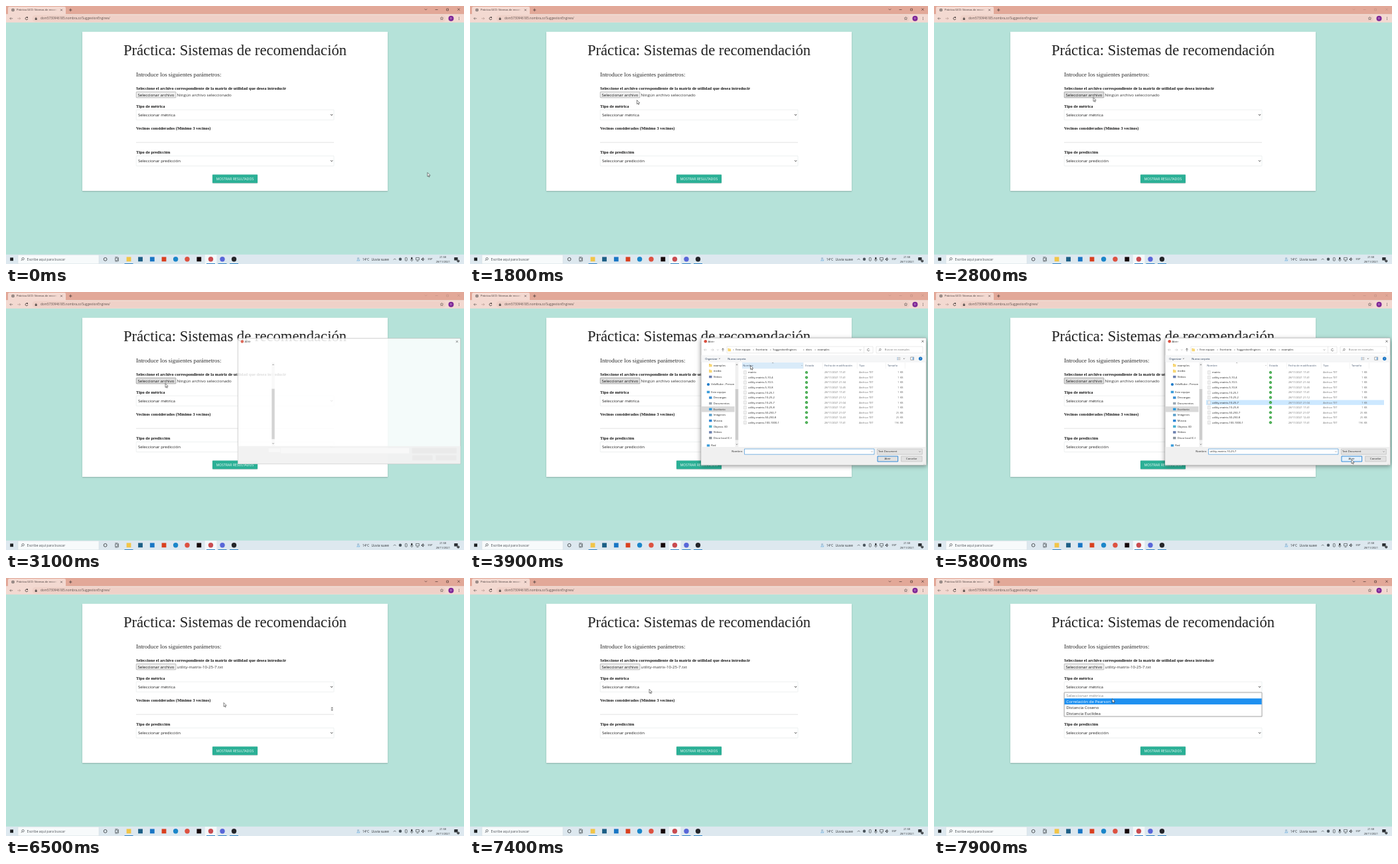
These frames come from a looping animation (690x388 px, 8 s). An HTML page with a canvas:

```html
<!DOCTYPE html>
<html lang="es">
<head>
<meta charset="utf-8">
<title>Sistemas de recomendación</title>
<style>
html, body { margin: 0; width: 100%; height: 100%; overflow: hidden; background: #b5e2d9; }
canvas { display: block; width: 690px; height: 388px; }
</style>
</head>
<body>
<canvas id="stage"></canvas>
<script>
const W = 690, H = 388, LOOP = 8000, STEP = 100;
const SANS = '"Open Sans", "Noto Sans", sans-serif';
const SERIF = '"Liberation Serif", "Noto Serif", serif';
const BAR = '#f3d9d1', FIELD = '#efd1c8';
const canvas = document.getElementById('stage');
const c = canvas.getContext('2d');
const dpr = window.devicePixelRatio || 1;
canvas.width = W * dpr;
canvas.height = H * dpr;

// Moments of the interaction, in ms
const AT = { press: 2300, blur: 2500, open: 3100, ready: 3200, pick: 5300, close: 5900, gone: 6000, menu: 7800 };
const PICKED = 6;

// Pointer stops: time, x, y
const PATH = [
  [0, 635, 250.5], [500, 635, 250.5], [1400, 353, 144.5], [1800, 251.5, 141.5],
  [2100, 240, 137.5], [3200, 240, 137.5], [3900, 422.5, 110.5], [4800, 466, 153],
  [5100, 461, 165], [5400, 461, 165], [5800, 629, 252], [5900, 629, 252],
  [6500, 328, 187.5], [6600, 328, 187.5], [7500, 268, 166.5], [7700, 268, 166.5], [7900, 268.5, 181.6]
];

const FILES = [
  ['matrix', '28', '17:41', 1], ['utility-matrix-5-10-4', '28', '17:41', 1],
  ['utility-matrix-5-10-5', '28', '21:34', 1], ['utility-matrix-5-10-8', '28', '12:45', 1],
  ['utility-matrix-10-25-1', '28', '17:41', 1], ['utility-matrix-10-25-2', '28', '21:12', 1],
  ['utility-matrix-10-25-7', '28', '21:04', 1], ['utility-matrix-10-25-8', '28', '17:41', 1],
  ['utility-matrix-50-250-7', '28', '21:07', 25], ['utility-matrix-50-250-8', '23', '12:43', 25],
  ['utility-matrix-100-1000-1', '28', '17:41', 196]
];

function pointer(t) {
  let i = 0;
  while (i < PATH.length - 2 && t >= PATH[i + 1][0]) i++;
  const [t0, x0, y0] = PATH[i], [t1, x1, y1] = PATH[i + 1];
  const k = Math.min(1, (t - t0) / (t1 - t0)), e = k * k * (3 - 2 * k);
  return { x: x0 + (x1 - x0) * e, y: y0 + (y1 - y0) * e };
}

const inside = (p, x0, y0, x1, y1) => p.x >= x0 && p.x <= x1 && p.y >= y0 && p.y <= y1;

function rect(x, y, w, h, fill) {
  c.fillStyle = fill;
  c.fillRect(x, y, w, h);
}

function box(x, y, w, h, fill, stroke, lw = 0.5, r = 0) {
  c.beginPath();
  c.roundRect(x, y, w, h, r);
  if (fill) { c.fillStyle = fill; c.fill(); }
  if (stroke) { c.strokeStyle = stroke; c.lineWidth = lw; c.stroke(); }
}

function dot(x, y, r, fill) {
  c.beginPath();
  c.arc(x, y, r, 0, Math.PI * 2);
  c.fillStyle = fill;
  c.fill();
}

function ring(x, y, r, color, lw = 0.6, a = 0, b = Math.PI * 2) {
  c.beginPath();
  c.arc(x, y, r, a, b);
  c.strokeStyle = color;
  c.lineWidth = lw;
  c.stroke();
}

function line(color, lw, ...p) {
  c.beginPath();
  for (let i = 0; i < p.length; i += 2) c.lineTo(p[i], p[i + 1]);
  c.strokeStyle = color;
  c.lineWidth = lw;
  c.stroke();
}

// y is the middle of the capitals
function text(s, x, y, size, color = '#222', align = 'left', font = SANS, weight = '') {
  c.font = `${weight} ${size}px ${font}`;
  c.textAlign = align;
  c.fillStyle = color;
  c.fillText(s, x, y + size * 0.34);
}

function shadow(color, blur, dy) {
  c.shadowColor = color;
  c.shadowBlur = blur * dpr;
  c.shadowOffsetY = dy * dpr;
}
const noShadow = () => shadow('transparent', 0, 0);

const chevron = (x, y, r, color, lw = 0.6) => line(color, lw, x - r, y - r / 2, x, y + r / 2, x + r, y - r / 2);
const cross = (x, y, r, color, lw = 0.6) => {
  line(color, lw, x - r, y - r, x + r, y + r);
  line(color, lw, x + r, y - r, x - r, y + r);
};
const arrow = (x, y, d, color) => {
  line(color, 0.7, x - 2.2, y, x + 2.2, y);
  line(color, 0.7, x + d * 0.5, y - 1.7, x + d * 2.2, y, x + d * 0.5, y + 1.7);
};
const lens = (x, y, color, s = 1) => {
  ring(x + 0.6 * s, y - 0.6 * s, 1.7 * s, color, 0.6);
  line(color, 0.7, x - 0.6 * s, y + 0.6 * s, x - 2.2 * s, y + 2.2 * s);
};
const folder = (x, y) => {
  rect(x - 2.3, y - 2.2, 2.2, 1, '#e5b93f');
  rect(x - 2.3, y - 1.6, 4.6, 3.8, '#f8d775');
};

function browser(focused) {
  const ink = focused ? '#3c2b27' : '#c08f83';
  rect(0, 0, W, 12.5, '#e2a898');
  rect(0, 12.2, W, 12.6, BAR);
  box(3, 1, 87, 13, BAR, null, 0, 2);
  box(39.5, 13.8, 623, 10, FIELD, null, 0, 5);
  dot(10.5, 6, 2.3, '#67605e');
  line(BAR, 0.5, 8.4, 6, 12.6, 6);
  line(BAR, 0.5, 10.5, 4, 10.5, 8);
  text('Práctica GCO: Sitemas de recom', 16, 6, 4.08, '#3a3030');
  const fade = c.createLinearGradient(69, 0, 78, 0);
  fade.addColorStop(0, BAR + '00');
  fade.addColorStop(1, BAR);
  rect(69, 2, 10, 9, fade);
  cross(83.5, 6, 1.3, '#3a3030');
  line('#3a3030', 0.7, 95, 6, 99.4, 6);
  line('#3a3030', 0.7, 97.2, 3.8, 97.2, 8.2);
  chevron(632.5, 5.2, 1.7, ink);
  line(ink, 0.6, 646.6, 5.5, 650.6, 5.5);
  box(663.7, 4.1, 2.8, 2.8, null, ink, 0.6);
  cross(682, 5.2, 1.7, ink);

  arrow(8, 18.8, -1, '#6b605c');
  arrow(19.5, 18.8, 1, '#b2968d');
  ring(31, 18.8, 1.9, '#3c3432', 0.75, 0.2, 5.4);
  rect(31.3, 16.4, 1.7, 1.6, '#3c3432');
  rect(43.7, 18.3, 3, 2.5, '#4d4644');
  ring(45.2, 18.2, 1, '#4d4644', 0.5, Math.PI, 0);
  text('dom5730946185.nombra.zz/SuggestionEngines/', 52, 18.8, 4.68, '#5d504c');
  c.beginPath();
  for (let i = 0; i < 10; i++) {
    const r = i % 2 ? 1.1 : 2.5, a = i * Math.PI / 5 - Math.PI / 2;
    c.lineTo(656.5 + r * Math.cos(a), 18.8 + r * Math.sin(a));
  }
  c.closePath();
  c.strokeStyle = '#4d4644';
  c.lineWidth = 0.5;
  c.stroke();
  dot(670.5, 18.8, 4, '#7d2596');
  text('D', 670.5, 18.8, 4, '#fff', 'center');
  for (let i = -1; i < 2; i++) dot(682.5, 18.8 + i * 1.7, 0.5, '#4d4644');
}

function select(y, label) {
  box(196.2, y - 7.6, 297.8, 15.2, '#fff', '#dbe0e0', 0.5, 0.6);
  text(label, 199, y, 6.15, '#222');
  chevron(490.6, y, 1.6, '#222', 0.9);
}

function page(t, p) {
  shadow('rgba(0,0,0,.22)', 1.7, 0.7);
  rect(115, 38.8, 460, 239.2, '#fff');
  noShadow();
  text('Práctica: Sistemas de recomendación', 345, 66.3, 22.64, '#212121', 'center', SERIF);
  text('Introduce los siguientes parámetros:', 196, 103.2, 8.9, '#2b2b2b', 'left', SERIF);
  const label = (s, y) => text(s, 196, y, 6.45, '#151515', 'left', SERIF, 'bold');
  label('Seleccione el archivo correspondiente de la matriz de utilidad que desea introducir', 124);
  label('Tipo de métrica', 151);
  label('Vecinos considerados (Mínimo 3 vecinos)', 184);
  label('Tipo de predicción', 220);

  const active = inside(p, 196, 129, 256, 138.2) || (t >= AT.press && t < AT.close);
  box(196.2, 129.1, 59.8, 8.8, active ? '#dedede' : '#eeeeee', active ? '#6a6a6a' : '#858585', 0.5, 0.8);
  text('Seleccionar archivo', 198.5, 133.6, 6.13, '#151515');
  text(t >= AT.close ? FILES[PICKED][0] + '.txt' : 'Ningún archivo seleccionado', 257.6, 133.6, 6.17, '#333');

  select(163.7, 'Seleccionar métrica');
  line('#c2c2c2', 0.5, 196, 205.2, 494, 205.2);
  const free = t < AT.open || t >= AT.gone;
  if (free && inside(p, 196, 187, 494, 205)) {
    rect(489, 193.7, 4.4, 6.4, '#efefef');
    c.fillStyle = '#444';
    for (const d of [-1, 1]) {
      c.beginPath();
      c.moveTo(489.8, 196.9 + d * 0.8);
      c.lineTo(492.6, 196.9 + d * 0.8);
      c.lineTo(491.2, 196.9 + d * 2.5);
      c.fill();
    }
  }
  select(233, 'Seleccionar predicción');

  shadow('rgba(0,0,0,.25)', 1.3, 0.6);
  box(311, 253.4, 68, 12.8, '#2bb096', null, 0, 0.7);
  noShadow();
  c.letterSpacing = '0.18px';
  text('MOSTRAR RESULTADOS', 345, 259.9, 4.83, '#fff', 'center');
  c.letterSpacing = '0px';
}

function menu(p) {
  shadow('rgba(0,0,0,.2)', 1.4, 0.6);
  box(196.2, 172.1, 297.8, 36, '#fff', '#777', 0.5);
  noShadow();
  const items = ['Seleccionar métrica', 'Correlación de Pearson', 'Distancia Coseno', 'Distancia Euclídea'];
  items.forEach((s, i) => {
    const y = 176.7 + i * 8.95;
    const hot = i > 0 && inside(p, 196, y - 4.5, 494, y + 4.5);
    if (hot) rect(196.5, y - 4.5, 297.2, 9, '#1e90f0');
    text(s, 199.3, y, 6.15, hot ? '#fff' : i ? '#222' : '#8a8a8a');
  });
}

function dialogFrame(solid) {
  if (solid) shadow('rgba(0,0,0,.45)', 7, 2);
  rect(348, 69, 339.5, 191.4, '#fff');
  noShadow();
  box(348.2, 69.2, 339.1, 191, null, '#8c8c8c', 0.5);
  dot(354.8, 74.2, 2.3, '#d9503f');
  text('Abrir', 358.6, 74.2, 4.1, '#222');
  cross(682, 74.2, 1.6, '#333');
  rect(348.5, 233, 338.6, 27, '#f0f0f0');
}

function scrollbar(thumb, track) {
  rect(399.6, 106, 4.8, 127, track);
  rect(399.8, 146, 4.4, 76.5, thumb);
  line('#555', 0.7, 400.8, 110, 402, 108.8, 403.2, 110);
  line('#555', 0.7, 400.8, 228.5, 402, 229.7, 403.2, 228.5);
}

function navPane() {
  // label, y, level, icon colour ('' is a folder)
  const items = [
    ['examples', 110.3, 1, ''], ['media', 119, 1, ''], ['Vídeos', 127.6, 1, '#6b7fae'],
    ['VeloNube - Person', 139, 0, '#1778c8'], ['Este equipo', 150.5, 0, '#3a9bd9'],
    ['Descargas', 159, 1, '#3b8fd4'], ['Documentos', 167.6, 1, '#9aa7b3'],
    ['Escritorio', 176.3, 1, '#2b9be0'], ['Imágenes', 185, 1, '#5a9ec9'],
    ['Música', 193.6, 1, '#2e86d6'], ['Objetos 3D', 202.3, 1, '#4ab0cf'],
    ['Vídeos', 211, 1, '#6b7fae'], ['Disco local (C:)', 219.6, 1, '#8b959c'], ['Red', 231, 0, '#3a9bd9']
  ];
  c.save();
  c.beginPath();
  c.rect(349, 105.5, 50, 127.2);
  c.clip();
  items.forEach(([s, y, level, color], i) => {
    const x = level ? 362.3 : 359;
    if (i === 7) rect(349, y - 4.2, 49.5, 8.4, '#d9d9d9');
    if (!color) folder(x, y);
    else if (i === 3) dot(x, y, 2.1, color);
    else rect(x - 2.2, y - 1.8, 4.4, 3.5, color);
    text(s, level ? 366.8 : 363.3, y, 4.05, '#222');
  });
  c.restore();
}

function fileList(t, p) {
  if (inside(p, 410, 105, 502, 116)) rect(410, 106, 92, 9.3, '#d9ebf9');
  line('#666', 0.5, 455, 107, 456.2, 106.2, 457.4, 107);
  [['Nombre', 411.3], ['Estado', 505.3], ['Fecha de modificación', 534], ['Tipo', 586.2], ['Tamaño', 629]]
    .forEach(([s, x]) => text(s, x, 110.6, 4.05, '#4a5b73'));
  for (const x of [502.5, 531.3, 583.4, 626.4, 655.4]) line('#e3e3e3', 0.4, x, 106, x, 115.3);
  chevron(500, 110.6, 0.8, '#777', 0.4);

  FILES.forEach(([name, day, hour, kb], i) => {
    const y = 121 + i * 7.53;
    const picked = t >= AT.pick && i === PICKED;
    const hot = inside(p, 410, y - 3.76, 678, y + 3.76);
    if (picked || hot) rect(410, y - 3.7, 268, 7.4, picked ? '#cce8ff' : '#e5f3ff');
    box(412.6, y - 2.4, 3.6, 4.8, '#fff', '#a9a9a9', 0.4);
    for (let k = -1; k < 2; k++) line('#c4c4c4', 0.3, 413.3, y + k * 1.1, 415.5, y + k * 1.1);
    text(name, 419, y, 4.1, '#222');
    dot(507, y, 2.1, '#2fa13a');
    line('#fff', 0.5, 506, y, 506.7, y + 0.7, 508, y - 0.7);
    text(`${day}/11/2021 ${hour}`, 534, y, 3.95, '#6d6d6d');
    text('Archivo TXT', 586.2, y, 3.95, '#6d6d6d');
    text(kb + ' KB', 652.6, y, 3.95, '#6d6d6d', 'right');
  });
}

function dialogBody(t, p) {
  arrow(354.8, 87, -1, '#c4c4c4');
  arrow(365, 87, 1, '#c4c4c4');
  chevron(373.3, 87, 1, '#777', 0.5);
  line('#444', 0.7, 381, 89.2, 381, 84.8);
  line('#444', 0.7, 379.4, 86.4, 381, 84.8, 382.6, 86.4);
  box(387, 82, 220, 9.8, '#fff', '#d5d5d5');
  line('#d5d5d5', 0.5, 593.5, 82, 593.5, 91.8);
  folder(390.8, 87);
  [['Este equipo', 400.3], ['Escritorio', 430.4], ['SuggestionEngines', 456.2], ['docs', 506], ['examples', 523.4]]
    .forEach(([s, x]) => {
      line('#666', 0.5, x - 3.8, 86, x - 2.8, 87, x - 3.8, 88);
      text(s, x, 87, 4.08, '#222');
    });
  chevron(588, 87, 1.2, '#444', 0.5);
  ring(600.3, 87, 1.7, '#444', 0.6, 0.3, 5.5);
  box(612, 82, 70, 9.8, '#fff', '#d5d5d5');
  lens(617.5, 87, '#666', 0.8);
  text('Buscar en examples', 624.8, 87, 4, '#757575');

  rect(348.5, 95, 338.6, 10.2, '#f5f6f7');
  line('#e2e2e2', 0.4, 348.5, 105.2, 687, 105.2);
  text('Organizar', 354.3, 100.2, 4.05, '#1f3553');
  chevron(376, 100.2, 0.9, '#333', 0.7);
  text('Nueva carpeta', 388.3, 100.2, 4.05, '#1f3553');
  for (let i = -1; i < 2; i++) {
    rect(643.6, 99.8 + i * 1.6, 1, 0.9, '#4c86bd');
    line('#888', 0.5, 645.2, 100.2 + i * 1.6, 648.4, 100.2 + i * 1.6);
  }
  chevron(654, 100.2, 0.9, '#333', 0.7);
  box(663.8, 98, 4.8, 4.2, '#fff', '#555', 0.5);
  rect(666.6, 98.2, 1.8, 3.8, '#78aee0');
  dot(678.7, 100.2, 2.7, '#1673c4');
  text('?', 678.7, 100.2, 4, '#fff', 'center');

  navPane();
  fileList(t, p);

  text('Nombre:', 411, 240, 4.05, '#222', 'right');
  box(413.5, 236, 195.5, 8.2, '#fff', '#2a86d6', 0.6);
  if (t >= AT.pick) text(FILES[PICKED][0], 415.5, 240, 4.1, '#222');
  chevron(605.6, 240, 1.1, '#555', 0.5);
  box(613.5, 236, 67.8, 8.2, '#e4e4e4', '#adadad');
  text('Text Document', 615, 240, 4.05, '#222');
  chevron(677.6, 240, 1.1, '#444', 0.5);
  const hot = inside(p, 614, 246.5, 645, 255.5);
  box(614, 247, 30.7, 8, hot ? '#e5f1fb' : '#e1e1e1', '#1b7fd6', 0.9);
  text('Abrir', 629.3, 251, 4.05, '#222', 'center');
  box(649.7, 247, 31.4, 8, '#e1e1e1', '#adadad');
  text('Cancelar', 665.3, 251, 4.05, '#222', 'center');
  for (let i = 0; i < 3; i++) rect(685.6 - i * 1.2, 258.8, 0.6, 0.6, '#aaa');
}

// Content placeholders while the window fades in
function dialogSkeleton() {
  box(395, 236.5, 18, 6, '#fafafa');
  box(413.5, 236, 195.5, 8.2, '#fafafa');
  box(613.5, 236, 67.8, 8.2, '#e9e9e9');
  box(614, 247, 30.7, 8, '#e9e9e9');
  box(649.7, 247, 31.4, 8, '#e9e9e9');
}

function dialog(t, p) {
  if (t < AT.open || t >= AT.gone) return;
  const opening = t < AT.ready, closing = t >= AT.close;
  c.save();
  if (opening || closing) {
    c.globalAlpha = opening ? 0.86 : 0.4;
    c.translate(450, 110);
    c.scale(0.989, 0.989);
    c.translate(-450, -110);
  }
  dialogFrame(!opening && !closing);
  if (opening) dialogSkeleton();
  else dialogBody(t, p);
  scrollbar('#cdcdcd', opening ? '#f8f8f8' : '#f0f0f0');
  c.restore();
}

function taskbar() {
  const ink = '#2b2f33';
  rect(0, 373.8, W, 14.2, '#dde8ef');
  rect(6.2, 378.4, 4.8, 4.8, '#1d2124');
  box(18, 374.3, 122, 13.5, '#f7fafb', '#c9d3d9', 0.4);
  lens(25, 380.8, ink);
  text('Escribe aquí para buscar', 31.6, 381, 5.05, '#4a4f54');
  ring(149.6, 380.8, 2.4, ink, 0.8);
  box(164.6, 379, 3.6, 3.8, null, ink, 0.6);
  line(ink, 0.6, 164.3, 377.7, 168.5, 377.7);
  line(ink, 0.6, 164.3, 384, 168.5, 384);
  line(ink, 0.6, 169.4, 378, 169.4, 384);
  rect(299.8, 374, 17.6, 14, '#f4f8fa');
  // x, colour, round
  [[185, '#f2c548', 0], [202.5, '#1d5f86', 0], [220.3, '#1976c5', 0], [238, '#d9401f', 0],
   [255.6, '#1b86c9', 1], [273, '#dd5140', 1], [290.8, '#16090b', 0], [308.5, '#c94c50', 1],
   [326, '#5866d8', 1], [343.5, '#25262a', 1]]
    .forEach(([x, color, round]) => round ? dot(x, 380.8, 3.7, color) : rect(x - 3.4, 377.4, 6.8, 6.8, color));
  for (const x of [185, 308.5, 326, 343.5]) rect(x - 6.5, 387, 13, 1, '#2f82c4');

  for (let i = 0; i < 3; i++) line('#4d9fdc', 0.7, 529.5 + i * 1.7, 381.4, 528.8 + i * 1.7, 383.6);
  dot(530.6, 379.6, 1.7, '#a9c3d6');
  text('14°C', 537, 381, 4.7, ink);
  text('Lluvia suave', 550.8, 381, 4.6, ink);
  line(ink, 0.6, 583.8, 381.7, 585.6, 379.9, 587.4, 381.7);
  dot(594, 380.8, 2.2, '#4a555d');
  box(601.4, 378.4, 2.8, 4.8, null, ink, 0.6, 0.8);
  box(610.2, 377.8, 2.2, 3.8, ink, null, 0, 1.1);
  ring(611.3, 381, 2, ink, 0.5, 0, Math.PI);
  line(ink, 0.5, 611.3, 383, 611.3, 384.2);
  box(617.6, 378.4, 4.8, 3.5, null, ink, 0.6);
  line(ink, 0.6, 618.6, 383.6, 621.4, 383.6);
  rect(625.8, 380, 1.3, 1.8, ink);
  line(ink, 0.8, 627, 381.9, 628.4, 383, 628.4, 378.7, 627, 379.8);
  ring(628.2, 380.8, 1.8, ink, 0.5, -0.9, 0.9);
  text('ESP', 639, 381, 4.1, ink, 'center');
  text('21:58', 658.3, 377.7, 4, ink, 'center');
  text('28/11/2021', 658.3, 384.2, 4, ink, 'center');
  box(675.2, 378, 5.4, 4.4, ink, null, 0, 0.4);
  dot(681.3, 383.4, 2, '#343a3f');
  text('2', 681.3, 383.4, 2.8, '#fff', 'center');
}

function cursor({ x, y }) {
  c.beginPath();
  [[0, 0], [0, 6], [1.4, 4.8], [2.3, 6.8], [3.2, 6.4], [2.3, 4.4], [4.2, 4.3]]
    .forEach(([dx, dy]) => c.lineTo(x + dx, y + dy));
  c.closePath();
  c.fillStyle = '#fff';
  c.fill();
  c.strokeStyle = '#222';
  c.lineWidth = 0.55;
  c.stroke();
}

function draw(t) {
  const p = pointer(t);
  c.setTransform(dpr, 0, 0, dpr, 0, 0);
  rect(0, 0, W, H, '#b5e2d9');
  browser(t < AT.blur || t >= AT.close);
  page(t, p);
  if (t >= AT.menu) menu(p);
  dialog(t, p);
  taskbar();
  cursor(p);
}

const start = performance.now();
function tick() {
  const t = Math.max(0, performance.now() - start) % LOOP;
  draw(Math.floor(t / STEP) * STEP);
  requestAnimationFrame(tick);
}
tick();
</script>
</body>
</html>
```
